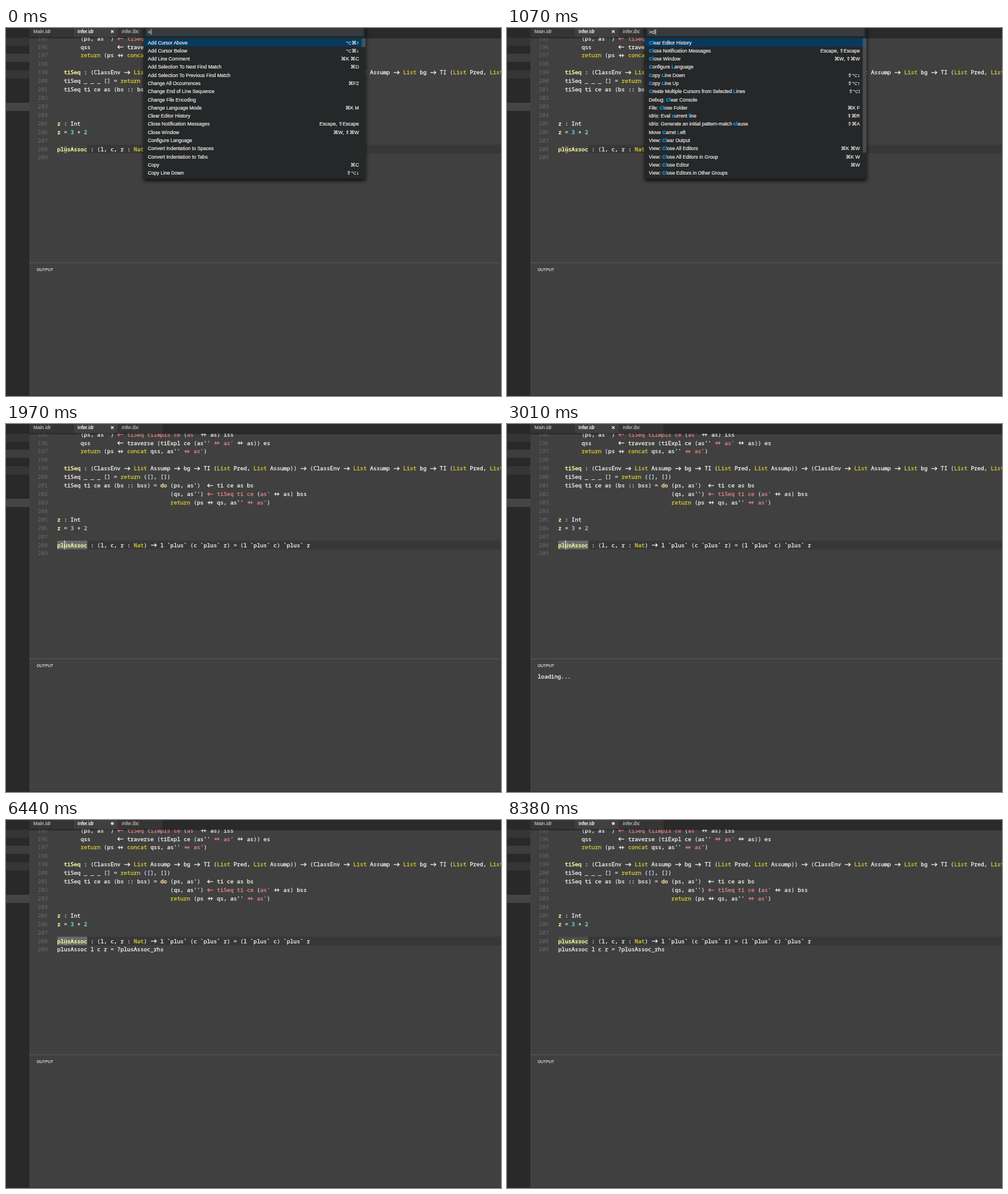
These frames come from a looping animation (869 by 645 pixels, 8480 ms). An HTML page:

```html
<!DOCTYPE html>
<html lang="en">
<head>
<meta charset="utf-8">
<title>Editor: generate a pattern-match clause</title>
<style>
html, body { margin: 0; width: 100%; height: 100%; overflow: hidden; background: #404040; }
svg { display: block; width: 869px; height: 645px; }
text { white-space: pre; stroke: currentColor; stroke-width: 0; }
.code { font: 500 9.733px "Noto Sans Mono", "DejaVu Sans Mono", monospace; stroke-width: .32px; }
.code.head { stroke-width: .55px; }
.code.number { stroke-width: 0; }
.ui { font: 8.6px "Liberation Sans", "DejaVu Sans", sans-serif; }
.pick { stroke-width: .22px; }
</style>
</head>
<body>
<svg id="stage" viewBox="0 0 869 645" xmlns="http://www.w3.org/2000/svg"></svg>
<script>
const LOOP = 8480, CELL = 5.84, LEFT = 90, PITCH = 14.92, ROW = 14.28;
const stage = document.getElementById('stage');

function add(parent, tag, attrs, content) {
  const el = document.createElementNS('http://www.w3.org/2000/svg', tag);
  for (const k in attrs) el.setAttribute(k, attrs[k]);
  if (content !== undefined) el.textContent = content;
  parent.appendChild(el);
  return el;
}
const group = (parent = stage) => add(parent, 'g', {});
const rect = (parent, x, y, width, height, fill) => add(parent, 'rect', { x, y, width, height, fill });
const label = (parent, x, y, fill, content, extra) =>
  add(parent, 'text', { x, y, fill, color: fill, class: 'ui', ...extra }, content);
const mono = (parent, x, y, fill, content, kind = '') =>
  add(parent, 'text', { x, y, fill, color: fill, class: 'code ' + kind }, content);
const show = (el, on) => el.setAttribute('visibility', on ? 'visible' : 'hidden');

// ---- code: ^head^ is a definition, ~text~ is the mis-tokenised red run
const COLORS = { head: '#f6f59c', red: '#e58585', name: '#d9cc2e', paren: '#c6dbee',
  num: '#7fdfe6', key: '#f6dca6', plain: '#f4f4f0' };
const LINES = {
  195: "       (ps, as'`')~ <- tiSeq tiImpls ce (as'~ ++ as) iss",
  196: "       qss        <- traverse (tiExpl ce (as'`'~ ++ as'~ ++ as)) es",
  197: "       return (ps ++ concat qss, as'`'~ ++ as'~)",
  199: "  ^tiSeq^ : (ClassEnv -> List Assump -> bg -> TI (List Pred, List Assump)) -> " +
       "(ClassEnv -> List Assump -> List bg -> TI (List Pred, List Assump))",
  200: "  tiSeq _ _ _ [] = return ([], [])",
  201: "  tiSeq ti ce as (bs :: bss) = do (ps, as')  <- ti ce as bs",
  202: " ".repeat(34) + "(qs, as'`')~ <- tiSeq ti ce (as'~ ++ as) bss",
  203: " ".repeat(34) + "return (ps ++ qs, as'`'~ ++ as'~)",
  205: "^z^ : Int",
  206: "^z^ = 3 + 2",
  208: "^plusAssoc^ : (l, c, r : Nat) -> l @plus@ (c @plus@ r) = (l @plus@ c) @plus@ r"
};
const TOKEN = /\^|~|`'|->|<-|\+\+|[()[\]]|\b(?:List|Nat|return|concat|do)\b|\b\d\b|[\w'@]+|\s+|[^\w\s]/g;
const LIGATURES = {
  '->': 'M.9 0H10.4M7.4-2.9L10.5 0L7.4 2.9',
  '<-': 'M10.6 0H1.2M4.2-2.9L1.1 0L4.2 2.9',
  '++': 'M1 0H10.6M3.8-2.8V2.8M7.9-2.8V2.8'
};
const baseline = n => 36.5 + (n - 196) * PITCH;

function colorOf(tok, red) {
  if (tok === "`'" || /^[()[\]]$/.test(tok)) return COLORS.paren;
  if (red) return COLORS.red;
  if (/^(List|Nat|return|concat)$/.test(tok)) return COLORS.name;
  if (tok === 'do') return COLORS.key;
  return /^\d$/.test(tok) ? COLORS.num : COLORS.plain;
}

function codeLine(parent, n, src) {
  let col = 0, head = false, red = false;
  for (const tok of src.match(TOKEN)) {
    if (tok === '^') { head = !head; continue; }
    if (tok === '~') { red = !red; continue; }
    const x = LEFT + col * CELL, y = baseline(n);
    const fill = head ? COLORS.head : colorOf(tok, red);
    const word = tok === "`'" ? "'" : tok.replaceAll('@', '`');
    if (LIGATURES[tok]) {
      add(parent, 'path', { d: LIGATURES[tok], transform: `translate(${x} ${y - 3.2})`,
        fill: 'none', stroke: fill, 'stroke-width': 1.25 });
    } else if (word.trim()) {
      mono(parent, x, y, fill, word, head || tok === 'do' ? 'head' : '');
    }
    col += word.length;
  }
}

// ---- editor
rect(stage, 0, 0, 869, 645, '#404040');
rect(stage, LEFT, 204.5, 779, 15, '#373737');
const wordMark = rect(stage, LEFT, 204.5, 52.6, 15, '#414141');
const code = group();
for (let n = 195; n <= 209; n++) {
  mono(code, 55.8, baseline(n), '#6a6a6a', n, 'number');
  if (LINES[n]) codeLine(code, n, LINES[n]);
}
const clause = group();
codeLine(clause, 209, 'plusAssoc l c r = ?plusAssoc_rhs');
const caret = rect(stage, 102, 204, 1.2, 16, '#f4f4f0');

// ---- output panel
rect(stage, 41, 411, 828, 1, '#5b5b5b');
label(stage, 53.7, 426.3, '#e4e4e4', 'OUTPUT', { class: 'ui pick', style: 'font-size:7.1px' });
const loading = mono(stage, 54, 446, COLORS.plain, 'loading...');
rect(stage, 41, 644, 828, 1, '#2a2a2a');

// ---- side bar and tabs
rect(stage, 0, 0, 41, 645, '#29292a');
[[17, '#353536'], [45, '#3d3d3e'], [74, '#363638'], [131, '#454546']]
  .forEach(([y, fill]) => rect(stage, 0, y, 41, 14.3, fill));
rect(stage, 41, 0, 828, 16, '#2a2a2b');
rect(stage, 41, 0, 77.5, 16, '#353536');
rect(stage, 119, 0, 77.5, 16, '#404040');
rect(stage, 197, 0, 77.5, 16, '#353536');
[.45, .25, .08].forEach((a, i) => rect(stage, 41, 16 + i, 828, 1, `rgba(0,0,0,${a})`));
label(stage, 48, 9, '#bcbcbc', 'Main.idr', { class: 'ui pick' });
label(stage, 125.5, 9, '#ffffff', 'Infer.idr', { class: 'ui pick' });
label(stage, 203, 9, '#bcbcbc', 'Infer.ibc', { class: 'ui pick', style: 'font-style:italic' });
const cross = add(stage, 'path', { d: 'M184.3 3.9l4.6 4.6m0-4.6l-4.6 4.6', stroke: '#f0f0f0', 'stroke-width': 1.4 });
const dot = add(stage, 'circle', { cx: 186.6, cy: 6.1, r: 2.7, fill: '#cfcfcf' });

// ---- command palette
const ALL = `Add Cursor Above|⌥⌘↑
Add Cursor Below|⌥⌘↓
Add Line Comment|⌘K ⌘C
Add Selection To Next Find Match|⌘D
Add Selection To Previous Find Match
Change All Occurrences|⌘F2
Change End of Line Sequence
Change File Encoding
Change Language Mode|⌘K M
Clear Editor History
Close Notification Messages|Escape, ⇧Escape
Close Window|⌘W, ⇧⌘W
Configure Language
Convert Indentation to Spaces
Convert Indentation to Tabs
Copy|⌘C
Copy Line Down|⇧⌥↓`.split('\n');
const CL = `Clear Editor History
Close Notification Messages|Escape, ⇧Escape
Close Window|⌘W, ⇧⌘W
Configure Language
Copy Line Down|⇧⌥↓
Copy Line Up|⇧⌥↑
Create Multiple Cursors from Selected Lines|⇧⌥I
Debug: Clear Console
File: Close Folder|⌘K F
Idris: Eval current line|⇧⌘R
Idris: Generate an initial pattern-match clause|⇧⌘A
Move Carret Left
View: Clear Output
View: Close All Editors|⌘K ⌘W
View: Close All Editors in Group|⌘K W
View: Close Editor|⌘W
View: Close Editors in Other Groups`.split('\n');
const THUMB = { '': 15, c: 20, cl: 200 };

function itemsFor(query) {
  if (query.length < 2) return ALL;
  return query === 'cl' ? CL : CL.filter(s => s.includes('match ' + query));
}

// Splits a label so that every odd part is a match.
function split(name, query) {
  if (!query) return [name];
  let at = name.search(new RegExp('\\b' + query, 'i'));
  if (at < 0 && query.length === 1) at = name.toLowerCase().indexOf(query);
  if (at >= 0) {
    const end = at + query.length;
    return [name.slice(0, at), name.slice(at, end), name.slice(end)];
  }
  return name.match(/^(.*?)(\bc)(.*?)(\bl)(.*)$/i).slice(1);
}

const palette = group();
function drawPalette(query) {
  palette.replaceChildren();
  const items = itemsFor(query);
  const panel = rect(palette, 242, -6, 389, 28 + items.length * ROW, '#262728');
  panel.style.filter = 'drop-shadow(0 3px 3px rgba(0,0,0,.85))';
  rect(palette, 246, -2, 381.5, 16, '#0b476c');
  rect(palette, 247, -2, 379.5, 15, '#3a3a3b');
  const input = label(palette, 249, 10, '#e0e0e0', '>' + query, { class: 'ui pick' });
  rect(palette, 249.3 + input.getComputedTextLength(), 2, .9, 10, '#e8e8e8');
  rect(palette, 242, 18.4, 389, ROW, '#073a5e');
  items.forEach((item, i) => {
    const [name, keys] = item.split('|'), y = 28.6 + i * ROW;
    const line = label(palette, 249, y, '#f0f0f0', '', { class: 'ui pick' });
    split(name, query).forEach((part, k) => {
      const span = add(line, 'tspan', {}, part);
      if (k % 2) span.style.cssText = 'fill:#0f9ffa;stroke:#0f9ffa;font-weight:700';
    });
    if (keys) label(palette, 619.6, y, '#f0f0f0', keys, { class: 'ui pick', 'text-anchor': 'end' });
  });
  if (query in THUMB) rect(palette, 624.5, 18.4, 6.5, THUMB[query], 'rgba(121,121,121,.45)');
}

// ---- mouse pointer
const mouse = group();
const BEAM = 'M-2.6-5Q-.4-5 0-3.8Q.4-5 2.6-5M0-3.8V3.8M-2.6 5Q-.4 5 0 3.8Q.4 5 2.6 5';
add(mouse, 'path', { d: BEAM, fill: 'none', stroke: 'rgba(255,255,255,.5)', 'stroke-width': 1.9 });
add(mouse, 'path', { d: BEAM, fill: 'none', stroke: '#3a3a3a', 'stroke-width': .8 });

const clamp = v => Math.min(1, Math.max(0, v));
// Progress that advances only every 150 ms.
const stepped = (t, from, steps) => clamp((Math.floor((t - from) / 150) + 1) / steps);
function mousePos(t) {
  const a = stepped(t, 6590, 5), b = stepped(t, 7630, 4);
  const p = a * a * (3 - 2 * a), q = b * (2 - b);
  return [104.5 + 651.5 * p + 112 * q, 213.5 + 370.5 * p + 72 * q];
}

// ---- timeline
const TYPED = [[0, ''], [150, 'c'], [330, 'cl'], [620, 'c'], [770, ''], [920, 'c'],
  [1070, 'cl'], [1220, 'clau'], [1370, 'clause']];
const BLINK = [1970, 2420, 3010, 3460, 4060, 4510, 4960, 5550, 6000, 6440, 7040, 7480, 8080, 8380];
let drawn = null;

function update(t) {
  const open = t < 1820, done = t >= 5110;
  show(palette, open);
  if (open) {
    const query = TYPED.filter(([at]) => at <= t).pop()[1];
    if (query !== drawn) drawPalette(drawn = query);
  }
  wordMark.setAttribute('fill', t < 1970 ? '#414141' : t < 8380 ? '#696b69' : '#4c4e4b');
  show(caret, BLINK.filter(at => at <= t).length % 2);
  show(loading, t >= 2570 && !done);
  show(clause, done);
  show(dot, done);
  show(cross, !done);
  const [x, y] = mousePos(t);
  mouse.setAttribute('transform', `translate(${x} ${y})`);
}

function frame() {
  update(performance.now() % LOOP);
  requestAnimationFrame(frame);
}
frame();
</script>
</body>
</html>
```
